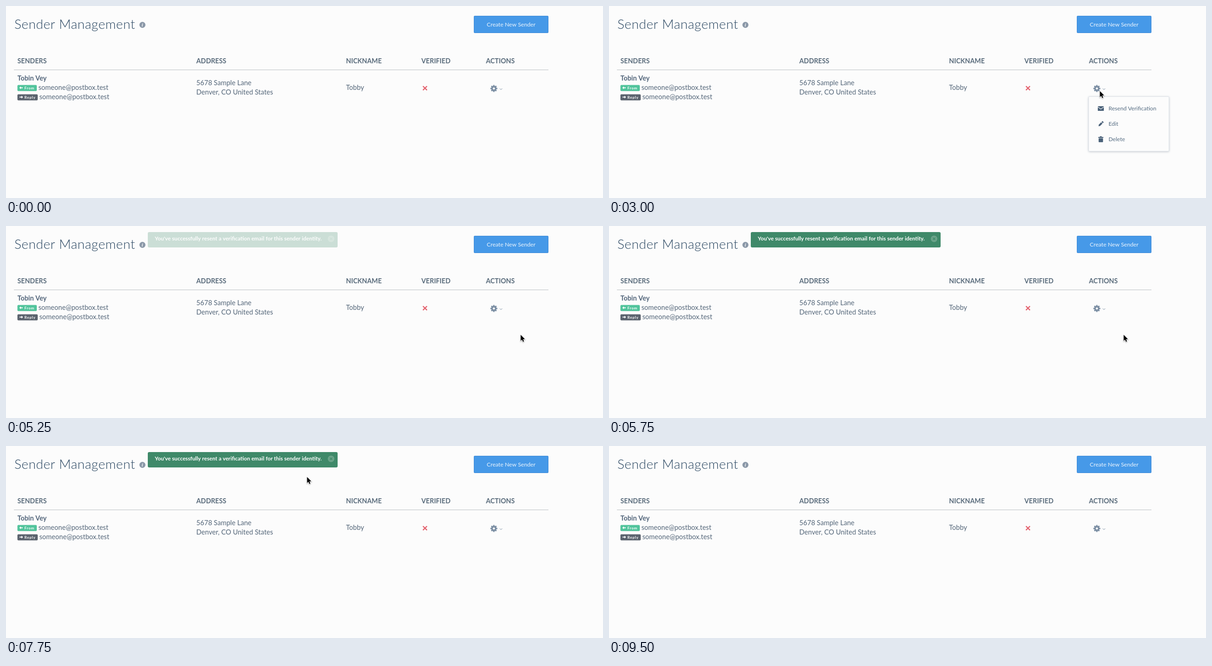
Animation of 1280 by 412 pixels, one loop 10000 ms. Source, as an HTML page with a canvas:

```html
<!DOCTYPE html>
<html lang="en">
<head>
<meta charset="utf-8">
<title>Sender Management</title>
<style>
html, body { margin: 0; width: 100%; height: 100%; overflow: hidden; background: #fcfcfc; }
canvas { display: block; width: 1280px; height: 412px; }
</style>
</head>
<body>
<canvas id="stage"></canvas>
<script>
const W = 1280, H = 412, LOOP = 10000, STEP = 250;
const canvas = document.getElementById('stage');
const ctx = canvas.getContext('2d');
const dpr = window.devicePixelRatio || 1;
canvas.width = W * dpr;
canvas.height = H * dpr;

const SLATE = '#55677a', HEAD = '#596b7b', NAVY = '#294661', ICON = '#7b8ea3', PAPER = '#fcfcfc';

// Each move starts where the last one ended; "via" bends it.
const entry = { x: 1193, y: 311 };
const moves = [
  { from: 500, to: 1500, x: 1035, y: 252, via: { x: 1096, y: 190 } },
  { from: 1500, to: 1750, x: 1053, y: 182 },
  { from: 3000, to: 3750, x: 1104, y: 233 },
  { from: 5750, to: 7000, x: 314, y: 63, via: { x: 750, y: 366 } },
  { from: 7000, to: 7750, x: 646, y: 66 },
  { from: 7750, to: 8250, x: 696, y: 27 },
  { from: 8500, to: 9250, x: 924, y: 62 }
];

const ramp = (t, from, to) => Math.min(1, Math.max(0, (t - from) / (to - from)));
const smooth = s => s * s * (3 - 2 * s);
const bend = (a, c, b, s) => (1 - s) ** 2 * a + 2 * s * (1 - s) * c + s * s * b;

function pointerAt(t) {
  let pos = entry;
  for (const m of moves) {
    if (t < m.from) break;
    const s = ramp(t, m.from, m.to);
    const via = m.via || { x: (pos.x + m.x) / 2, y: (pos.y + m.y) / 2 };
    pos = { x: bend(pos.x, via.x, m.x, s), y: bend(pos.y, via.y, m.y, s) };
  }
  return pos;
}

function text(str, x, y, size, color, weight = 400, spacing = 0, align = 'left') {
  ctx.font = `${weight} ${size}px Lato, "Open Sans", sans-serif`;
  ctx.letterSpacing = spacing + 'px';
  ctx.textAlign = align;
  ctx.fillStyle = color;
  ctx.fillText(str, x, y);
}

function box(x, y, w, h, r, fill) {
  ctx.fillStyle = fill;
  ctx.beginPath();
  ctx.roundRect(x, y, w, h, r);
  ctx.fill();
}

function disc(x, y, r, fill) {
  ctx.fillStyle = fill;
  ctx.beginPath();
  ctx.arc(x, y, r, 0, Math.PI * 2);
  ctx.fill();
}

function poly(points, fill) {
  ctx.beginPath();
  points.forEach(([x, y]) => ctx.lineTo(x, y));
  ctx.closePath();
  ctx.fillStyle = fill;
  ctx.fill();
}

function line(points, color, width) {
  ctx.beginPath();
  points.forEach(([x, y]) => ctx.lineTo(x, y));
  ctx.strokeStyle = color;
  ctx.lineWidth = width;
  ctx.stroke();
}

function cross(x, y, r, color, width) {
  line([[x - r, y - r], [x + r, y + r]], color, width);
  line([[x + r, y - r], [x - r, y + r]], color, width);
}

function at(x, y, draw, angle = 0) {
  ctx.save();
  ctx.translate(x, y);
  ctx.rotate(angle);
  draw();
  ctx.restore();
}

function shadowed(color, blur, draw) {
  ctx.save();
  ctx.shadowColor = color;
  ctx.shadowBlur = blur * dpr;
  ctx.shadowOffsetY = dpr;
  draw();
  ctx.restore();
}

// Fades a finished panel as one layer by covering it with paper.
function veil(x, y, w, h, alpha) {
  ctx.globalAlpha = 1 - alpha;
  box(x, y, w, h, 0, PAPER);
  ctx.globalAlpha = 1;
}

function badge(y, w, fill, label, dir) {
  box(24.5, y + 0.5, w, 13, 2, fill);
  at(32.5, y + 6.5, () => {
    line([[-3.5 * dir, 0], [2 * dir, 0]], '#fff', 1.8);
    poly([[4 * dir, 0], [0.5 * dir, -3], [0.5 * dir, 3]], '#fff');
  });
  text(label, 39.5, y + 10, 8, '#fff', 700, 0.8);
}

function gear(x, y) {
  for (let i = 0; i < 8; i++) {
    at(x, y, () => box(-1.6, -7.5, 3.2, 4, 0.6, ICON), i * Math.PI / 4);
  }
  disc(x, y, 5.6, ICON);
  disc(x, y, 2.3, PAPER);
}

function page() {
  box(0, 0, W, H, 0, PAPER);
  text('Sender Management', 18, 49, 28, NAVY, 300, 0.5);

  disc(292.5, 40.5, 6.5, '#8b98a8');
  ctx.font = 'italic bold 10px "Liberation Serif", serif';
  ctx.letterSpacing = '0px';
  ctx.textAlign = 'center';
  ctx.fillStyle = '#fff';
  ctx.fillText('i', 292.5, 44);

  box(1003, 21, 160, 37, 2, '#3a88d8');
  box(1004, 22, 158, 35, 1, '#4699e8');
  text('Create New Sender', 1083, 44, 12.2, '#eef6fd', 400, 0, 'center');

  const heads = { SENDERS: 24.5, ADDRESS: 408, NICKNAME: 729, VERIFIED: 890.5, ACTIONS: 1029 };
  for (const label in heads) text(label, heads[label], 123, 14.2, HEAD, 700);
  box(17, 136, 1146, 2, 0, '#dadcde');

  text('Tobin Vey', 24.5, 159.5, 14.4, '#52657a', 700);
  badge(169, 41.5, '#52c49c', 'From', -1);
  badge(189, 43.5, '#5b636e', 'Reply', 1);
  text('someone@postbox.test', 69.5, 180, 14.6, SLATE);
  text('someone@postbox.test', 71.5, 200, 14.6, SLATE);
  text('5678 Sample Lane', 408, 170, 14.6, SLATE);
  text('Denver, CO United States', 408, 190, 14.6, SLATE);
  text('Tobby', 729, 180, 14.6, SLATE);

  cross(898.3, 176.3, 4.3, '#e4636f', 2.4);
  gear(1046, 177);
  line([[1058.5, 177], [1061.2, 179.5], [1064, 177]], ICON, 1);
}

function envelope(x, y, color) {
  box(x - 6.5, y - 5, 13, 10, 1, color);
  line([[x - 6.5, y - 3.5], [x, y + 1.2], [x + 6.5, y - 3.5]], '#e9ecef', 1.3);
}

function pencil(x, y, color) {
  at(x, y, () => {
    poly([[-7, 0], [-4, -2], [3, -2], [3, 2], [-4, 2]], color);
    box(4, -2, 3, 4, 0.8, color);
  }, -Math.PI / 4);
}

function trash(x, y, color) {
  box(x - 5.5, y - 5, 11, 2, 0.5, color);
  box(x - 2, y - 6.5, 4, 2, 0.5, color);
  box(x - 4.7, y - 2.3, 9.4, 8.6, 1, color);
}

function menu(alpha, hover) {
  shadowed('rgba(50, 70, 95, 0.28)', 4, () => box(1028, 194, 173, 118, 2, '#dfe4e9'));
  box(1029, 195, 171, 116, 1, PAPER);
  if (hover) box(1029, 204, 171, 32, 0, '#e9ecef');
  ['Resend Verification', 'Edit', 'Delete'].forEach((label, i) => {
    const y = 220 + 33 * i, active = hover && i === 0;
    [envelope, pencil, trash][i](1054.5, y, active ? NAVY : '#4a6179');
    text(label, 1071, y + 4, 12.1, active ? NAVY : '#546b81');
  });
  veil(1022, 188, 186, 132, alpha);
}

function banner(alpha) {
  box(304, 13, 407, 33, 3, '#3f8969');
  text("You've successfully resent a verification email for this sender identity.", 319, 31, 11.65, '#fff', 700);
  disc(697, 27.5, 7, '#6aa389');
  cross(697, 27.5, 2.5, '#3f8969', 1.6);
  veil(304, 13, 407, 33, alpha);
}

function pointer({ x, y }) {
  const shape = [[0, 0], [0, 13], [2.9, 10.3], [4.9, 15], [7.1, 14.1], [5.1, 9.5], [9.1, 9.3]];
  at(x - 0.5, y + 0.5, () => {
    shadowed('rgba(0, 0, 0, 0.35)', 2, () => line([...shape, shape[0]], '#fff', 1.8));
    poly(shape, '#000');
  });
}

function draw(now) {
  const t = Math.floor(now % LOOP / STEP) * STEP;
  const pos = pointerAt(t);
  const menuAlpha = ramp(t, 2500, 3000) - ramp(t, 4500, 5000);
  const bannerAlpha = smooth(ramp(t, 5000, 5750)) - smooth(ramp(t, 8250, 9000));
  ctx.setTransform(dpr, 0, 0, dpr, 0, 0);
  page();
  if (menuAlpha > 0) menu(menuAlpha, pos.y >= 204);
  if (bannerAlpha > 0) banner(bannerAlpha);
  if (t >= 500 && t < 9500) pointer(pos);
}

let start;
function tick(now) {
  start ??= now;
  draw(now - start);
  requestAnimationFrame(tick);
}
draw(0);
requestAnimationFrame(tick);
</script>
</body>
</html>
```
